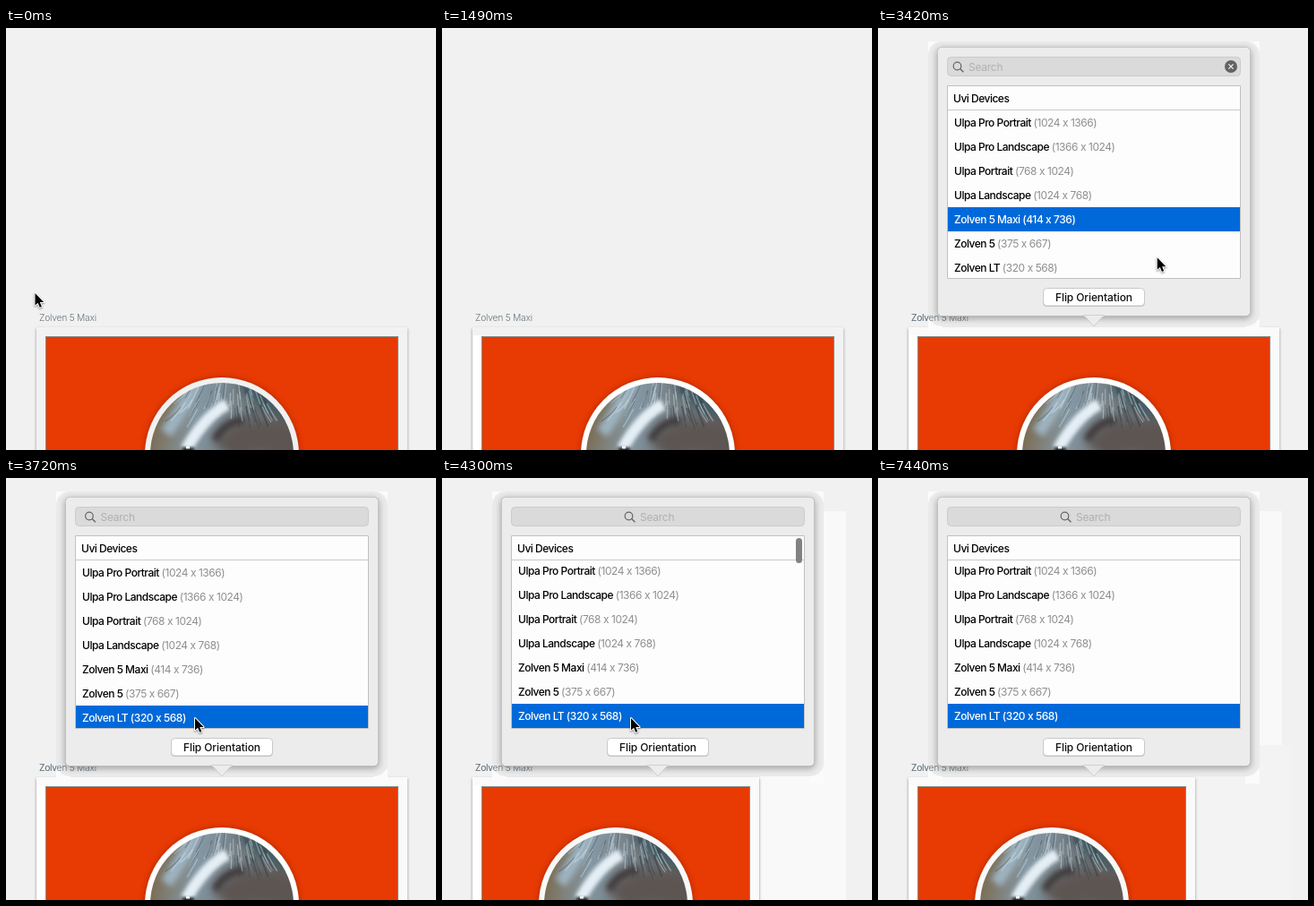
These frames come from a looping animation (480x471 px, 8910 ms). An HTML page with a canvas:

```html
<!DOCTYPE html>
<html lang="en">
<head>
<meta charset="utf-8">
<title>Artboard size picker</title>
<style>
html, body { margin: 0; width: 100%; height: 100%; overflow: hidden; background: #f1f1f1; }
canvas { display: block; }
</style>
</head>
<body>
<canvas id="stage" width="480" height="471"></canvas>
<script>
const ctx = document.getElementById('stage').getContext('2d');
const LOOP = 8910;
const STEP = 147;
const OPEN = 2390, PICK = 3720, RESIZE = 3860;
const ROW = 27;
const FONT = 'Inter, Roboto, sans-serif';
const ARROW = new Path2D('M0 0V13.6L3.1 10.8 5.2 15.8 7.4 14.9 5.3 10H9.6Z');

const ROWS = [
  'Ulpa Pro Portrait (1024 x 1366)',
  'Ulpa Pro Landscape (1366 x 1024)',
  'Ulpa Portrait (768 x 1024)',
  'Ulpa Landscape (1024 x 768)',
  'Zolven 5 Maxi (414 x 736)',
  'Zolven 5 (375 x 667)',
  'Zolven LT (320 x 568)'
];

// Progress from 0 to 1, advancing in visible steps
function progress(t, from, to) {
  const n = Math.round((to - from) / STEP);
  const u = Math.min(1, Math.max(0, (t - from) / (to - from)));
  return Math.floor(n * u + 1e-6) / n;
}

function glide(t, from, to, a, b) {
  const u = progress(t, from, to);
  const k = u * u * (3 - 2 * u);
  return a.map((v, i) => v + (b[i] - v) * k);
}

function pointerAt(t) {
  const board = [37, 369], row = [211, 268], button = [182, 299];
  if (t < 1190) return glide(t, 0, 300, [32.5, 296], board);
  if (t < 1490) return glide(t, 1040, 1490, board, [110, 490]);
  if (t < 2980) return null;
  if (t < 5200) return glide(t, 3130, 3580, [347, 252], row);
  if (t < 7000) return glide(t, 5050, 5350, row, button);
  if (t < 7440) return glide(t, 6850, 7440, button, [470, 480]);
  return null;
}

function rect(x, y, w, h, fill, c = ctx) {
  c.fillStyle = fill;
  c.fillRect(x, y, w, h);
}

function outline(color, width = 1) {
  ctx.strokeStyle = color;
  ctx.lineWidth = width;
  ctx.stroke();
}

function box(x, y, w, h, r, fill, stroke) {
  ctx.beginPath();
  ctx.roundRect(x, y, w, h, r);
  ctx.fillStyle = fill;
  ctx.fill();
  if (stroke) outline(stroke);
}

function line(x1, y1, x2, y2, color, width = 1) {
  ctx.beginPath();
  ctx.moveTo(x1, y1);
  ctx.lineTo(x2, y2);
  outline(color, width);
}

function disc(x, y, r, fill) {
  ctx.beginPath();
  ctx.arc(x, y, r, 0, Math.PI * 2);
  ctx.fillStyle = fill;
  ctx.fill();
}

// Draws text and returns the x where it ends
function label(str, x, y, color, size = 12, spacing = -0.5, weight = 500) {
  ctx.font = `${weight} ${size}px ${FONT}`;
  ctx.letterSpacing = spacing + 'px';
  ctx.fillStyle = color;
  ctx.fillText(str, x, y);
  return x + ctx.measureText(str).width;
}

function shadow(color, blur, dy = 0) {
  ctx.shadowColor = color;
  ctx.shadowBlur = blur;
  ctx.shadowOffsetY = dy;
}

const noShadow = () => shadow('transparent', 0);

// Soft abstract picture: gradient, a few broad strokes, random hairs
const picture = (() => {
  const cv = document.createElement('canvas');
  cv.width = 160;
  cv.height = 80;
  const c = cv.getContext('2d');
  const base = c.createLinearGradient(0, 20, 160, 50);
  ['#7a6546', '#8497a3', '#71787b', '#625c58'].forEach((col, i) => base.addColorStop(i / 3, col));
  rect(0, 0, 160, 80, base, c);

  const sweep = (color, width, blur, path) => {
    c.filter = `blur(${blur}px)`;
    c.strokeStyle = color;
    c.lineWidth = width;
    c.stroke(new Path2D(path));
  };
  sweep('#485d64', 30, 5, 'M108 -5Q130 20 165 34');
  sweep('#5d5552', 36, 6, 'M84 78Q112 46 165 72');
  sweep('#9db3c0', 14, 3, 'M52 -4Q40 26 18 56');
  sweep('#40393a', 9, 3, 'M72 64Q84 42 106 42');

  let seed = 7;
  const rnd = () => (seed = (seed * 16807) % 2147483647) / 2147483647;
  for (let i = 0; i < 70; i++) {
    const x = 34 + rnd() * 100, y = rnd() * 36 - 6;
    const bend = (x - 92) * 0.3;
    const tone = i % 2 ? 'rgba(205,224,235,.45)' : 'rgba(52,68,78,.4)';
    sweep(tone, 0.8 + rnd(), 0.7, `M${x} ${y}q${bend / 3} 8 ${bend} ${14 + rnd() * 10}`);
  }
  sweep('#e4eef5', 13, 2, 'M86 24Q62 36 40 74');
  sweep('#2b2a2b', 8, 1.5, 'M36 76H49');
  sweep('#f2f7fa', 3, 0.6, 'M40 72H44');
  return cv;
})();

function boardName() {
  label('Zolven 5 Maxi', 37, 327, '#66767f', 10.3, -0.25, 300);
}

function artboard(t) {
  const open = t >= OPEN, small = t >= RESIZE;
  const width = small ? 300 : 394;
  const mid = 44 + width / 2;
  if (small) {
    rect(355, 37, 96, 434, '#f9f9f9');
    if (t >= 7150) rect(355, 298, 107, 173, '#f3f3f3');
  }
  boardName();

  shadow('rgba(0,0,0,.4)', 3, 0.5);
  rect(34, 334, width + 20, 150, open ? '#fafafa' : '#f2f2f2');
  noShadow();
  if (t >= 1190) rect(35, 343, 9, 130, '#fff');

  rect(44, 344, width, 140, '#e83a03');
  ctx.beginPath();
  ctx.rect(44.5, 344.5, width - 1, 140);
  outline('#85897f');

  shadow('rgba(60,10,0,.35)', 6);
  disc(mid, 476, 86, t < 1190 ? '#f1f1f1' : small ? '#f9f9f9' : '#fff');
  noShadow();
  ctx.save();
  ctx.beginPath();
  ctx.arc(mid, 476, 80, 0, Math.PI * 2);
  ctx.clip();
  ctx.drawImage(picture, mid - 80, 396);
  ctx.restore();
}

function searchField(t) {
  box(77.5, 32.5, 327, 21, 4, '#dadada', '#cbcbcb');
  const x = 89 + 120 * progress(t, 3570, 4010) ** 3;
  ctx.beginPath();
  ctx.arc(x - 0.5, 42.5, 4.3, 0, Math.PI * 2);
  outline('#656565', 1.2);
  line(x + 2.6, 45.6, x + 6.5, 49.3, '#656565', 1.4);
  label('Search', x + 12, 47.6, '#b0b0b0', 12, -0.25, 400);
  if (t < PICK) {
    disc(394, 43, 7, '#626262');
    for (const s of [-2.6, 2.6]) line(394 - s, 40.4, 394 + s, 45.6, '#f0f0f0', 1.3);
  }
}

function list(t) {
  const scroll = t >= RESIZE ? 2 : 0;
  const chosen = t >= PICK ? 6 : 4;
  rect(77, 64, 328, 216, '#fdfdfd');
  ctx.save();
  ctx.beginPath();
  ctx.rect(78, 92, 326, 187);
  ctx.clip();
  ROWS.forEach((row, i) => {
    const top = 92 + i * ROW - scroll;
    const on = i === chosen;
    if (on) rect(78, top, 326, ROW, '#0069d9');
    const cut = row.indexOf('(');
    const end = label(row.slice(0, cut), 85, top + 18, on ? '#fff' : '#000');
    label(row.slice(cut), end, top + 18, on ? '#fff' : '#8e8e8e', 12, -0.45, on ? 500 : 400);
  });
  ctx.restore();
  label('Uvi Devices', 84, 83, '#000');
  line(78, 91.5, 404, 91.5, '#c9c9c9');
  ctx.beginPath();
  ctx.rect(77.5, 64.5, 327, 215);
  outline('#c0c0c0');

  if (t >= RESIZE) {
    ctx.globalAlpha = 1 - progress(t, 4150, 4600) ** 3;
    box(395, 67, 7, 28, 3.5, '#7d7d7d');
    ctx.globalAlpha = 1;
  }
}

function popover(t) {
  // Pale corners around the halo
  for (const x of [56, 410]) {
    for (const y of [15, 325]) rect(x, y, 16, 16, '#fbfbfb');
  }
  box(56, 15, 370, 318, 15, '#eaeaea');
  boardName();

  const balloon = new Path2D();
  balloon.roundRect(66.5, 21.5, 349, 300, 5);
  const tail = new Path2D('M229 321Q232 322 235 326L241 333 247 326Q250 322 253 321Z');
  shadow('rgba(0,0,0,.3)', 7, 2);
  ctx.fillStyle = '#ececec';
  ctx.strokeStyle = '#b5b5b5';
  ctx.lineWidth = 1;
  for (const part of [balloon, tail]) {
    ctx.stroke(part);
    ctx.fill(part);
    noShadow();
  }

  searchField(t);
  list(t);
  box(184.5, 291.5, 113, 19, 4, '#c4c4c4', '#b9b9b9');
  box(184.5, 290.5, 113, 19.5, 4, '#fff', '#c9c9c9');
  label('Flip Orientation', 198, 305, '#111', 12, -0.1);
}

function pointer(t) {
  const at = pointerAt(t);
  if (!at) return;
  ctx.save();
  ctx.translate(...at);
  ctx.lineJoin = 'round';
  ctx.lineWidth = 2;
  ctx.strokeStyle = '#fff';
  shadow('rgba(0,0,0,.45)', 2, 1);
  ctx.stroke(ARROW);
  noShadow();
  ctx.fillStyle = '#000';
  ctx.fill(ARROW);
  ctx.restore();
}

function draw(t) {
  rect(0, 0, 480, 471, '#f1f1f1');
  artboard(t);
  if (t >= OPEN) popover(t);
  pointer(t);
}

const start = performance.now();
function tick() {
  draw((performance.now() - start) % LOOP);
  requestAnimationFrame(tick);
}
tick();
</script>
</body>
</html>
```
